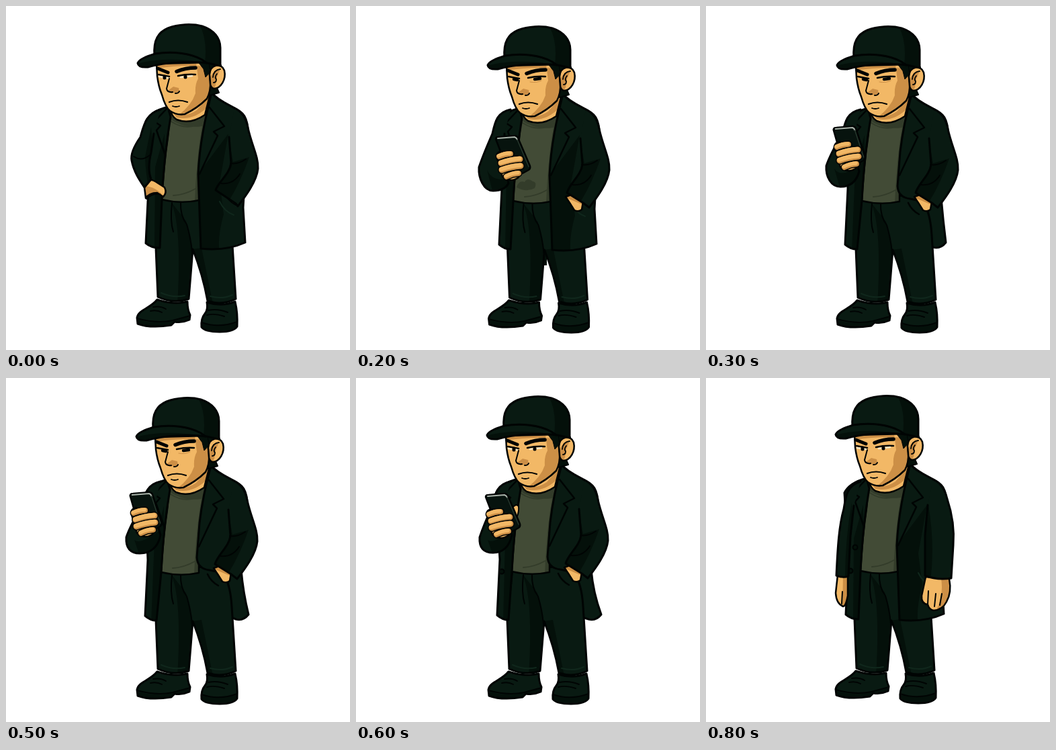
An HTML page with a canvas for the animation above (0.9 s loop, 512x512 px).

```html
<!DOCTYPE html>
<html lang="en">
<head>
<meta charset="utf-8">
<title>Man checking his phone</title>
<style>
  html, body { margin: 0; width: 100%; height: 100%; overflow: hidden; background: #fff; }
  canvas { display: block; width: 100vmin; height: 100vmin; }
</style>
</head>
<body>
<canvas id="stage" width="512" height="512"></canvas>
<script>
const ctx = document.getElementById('stage').getContext('2d');
const STEP = 100;
const INK = '#000403', COAT = '#091a12', DARK = '#04100a', LIGHT = '#10271c';
const SKIN = '#f2b866', TAN = '#cc8f46', SHIRT = '#424b36', MOSS = '#333c2a';

// head, body, legs: offsets; hem: left and right edge of the left coat panel
// elbow, under, cuff: corners of the raised sleeve; phone: its top left corner
const poses = [
  { head: [0, 0], body: [0, 0], legs: [0, 0], hem: [208, 229], left: 'thumb', right: 'deep' },
  { head: [0, 2], body: [1, 1], legs: [1, 0], hem: [209, 229], left: 'phone', right: 'pocket',
    phone: [145, 198], elbow: [166, 250], under: [192, 275], cuff: [220, 258], lean: -.15, down: true },
  { head: [0, 3], body: [2, 2], legs: [2.5, 1], hem: [211, 228], left: 'phone', right: 'pocket',
    phone: [208, 195], elbow: [183, 240], under: [204, 275], cuff: [227, 264], lean: 0, down: true, fold: true },
  { head: [-1, 3], body: [0, 2], legs: [0, 1], hem: [207, 225], left: 'phone', right: 'pocket', open: 357,
    phone: [190, 181], elbow: [179, 238], under: [200, 269], cuff: [228, 246], lean: -.1, down: true },
  { head: [-3, 3], body: [-2, 2], legs: [-3, .5], hem: [207, 224], left: 'phone', right: 'pocket', open: 356,
    phone: [178, 170], elbow: [175, 236], under: [195, 262], cuff: [227, 233], lean: -.17, down: true, button: true },
  { head: [-2, 2], body: [-1, 1], legs: [0, 0], hem: [208, 225], left: 'phone', right: 'pocket', open: 361,
    phone: [185, 172], elbow: [179, 237], under: [199, 261], cuff: [230, 234], lean: -.1, down: true },
  { head: [-1, 0], body: [0, 0], legs: [2, 0], hem: [210, 227], left: 'phone', right: 'pocket', open: 365,
    phone: [193, 174], elbow: [184, 237], under: [204, 260], cuff: [232, 234], lean: 0, button: true, thumb: true },
  { head: [-3, 2], body: [1, 1], legs: [-.5, 1], hem: [203, 228], left: 'pocket', right: 'pocket', down: true, buttons: true },
  { head: [-3, -1], body: [-2, -1], legs: [-2, -1], hem: [210, 229], left: 'hang', right: 'hang', buttons: true }
];

function fill(d, color) {
  ctx.fillStyle = color;
  ctx.fill(new Path2D(d));
}

function line(d, width = 2.5, color = INK) {
  ctx.lineWidth = width;
  ctx.strokeStyle = color;
  ctx.stroke(new Path2D(d));
}

function shape(d, color, width = 3) {
  fill(d, color);
  line(d, width);
}

function shaded(d, color, shadow, tone, width = 3) {
  fill(d, color);
  ctx.save();
  ctx.clip(new Path2D(d));
  fill(shadow, tone);
  ctx.restore();
  line(d, width);
}

function at([x, y], draw) {
  ctx.save();
  ctx.translate(x, y);
  draw();
  ctx.restore();
}

function drawLegs() {
  shaded('M231 284 L284 282 L306 279 L322 290 Q334 305 336 340 L342 436 Q322 446 300 439 Q293 400 278 362 L272 436 Q250 444 226 433 L223 360 Z',
    COAT, 'M246 292 Q262 330 255 445 L276 442 L278 364 L268 320 Z M277 362 L298 442 L308 443 L291 360 Z', DARK);
  line('M260 292 Q259 312 269 325 Q275 345 277 366 M247 293 Q244 320 249 336', 2);
  line('M231 427 Q249 435 266 431 M304 432 Q322 437 337 430', 2, LIGHT);
  shaded('M225 437 Q249 445 270 440 Q270 452 274 460 L273 467 Q262 472 251 470 L246 475 Q215 480 196 473 L195 464 C197 452 215 450 225 437 Z',
    COAT, 'M190 465 Q225 476 248 468 L276 460 V482 H190 Z', DARK);
  line('M195 465 Q224 473 248 468 L274 461 M219 448 Q230 446 238 451 M215 454 Q225 452 232 456', 2);
  shaded('M299 441 Q321 448 341 440 Q345 457 344 477 Q339 485 318 485 Q296 485 291 478 Q290 465 296 458 Q301 452 299 441 Z',
    COAT, 'M288 472 Q316 480 348 470 V490 H288 Z', DARK);
  line('M291 471 Q317 480 344 470 M301 453 Q315 450 330 456 M299 460 Q310 457 325 462', 2);
}

function drawShirt(p) {
  shaded('M244 160 L241 195 Q235 235 232 288 Q260 295 288 289 L288 230 L302 150 Z', SHIRT,
    'M244 160 Q270 181 304 158 L288 230 V292 H281 Q284 220 292 179 Q265 183 244 168 Z', MOSS, 2.5);
  line('M246 172 Q269 187 294 173', 2, MOSS);
  line('M249 282 Q266 281 282 272', 2, MOSS);
  if (p.fold) fill('M237 268 Q240 257 249 260 Q253 253 261 259 Q268 260 264 269 Q252 276 237 268 Z', MOSS);
}

function drawCoat(p) {
  const [l, r] = p.hem;
  shaded(`M241 150 L245 165 C241 192 236 215 232 288 L${r} 360 Q${l + 8} 360 ${l} 353 L${l + 4} 270 L208 172 Q215 157 241 150 Z`,
    COAT, `M236 190 L222 240 L${r - 8} 365 H${r + 4} L236 285 Z`, DARK);
  const shoulder = 'M306 129 C318 144 342 150 352 160 Q358 166 360 181';
  if (p.open) {
    shape(`${shoulder} L356 240 L338 292 L304 285 Q286 283 285 266 L289 215 C293 180 299 155 306 129 Z`, COAT);
    line('M301 291 Q306 302 317 308', 2.5);
  } else {
    shaded(`${shoulder} L353 300 L356 352 Q327 365 290 361 L286 250 C288 205 297 165 306 129 Z`,
      COAT, 'M286 250 L331 190 L318 262 L324 310 Q314 345 318 370 H286 Z', DARK);
    line('M318 291 Q325 306 339 311', 2, LIGHT);
  }
  line('M241 151 L221 172 L230 178 L224 185 L237 222', 2.5);
  line('M303 151 L325 179 L309 187 L315 193 L288 250', 2.5);
  if (p.button || p.buttons) dot(217, 288, 3.5);
  if (p.buttons) dot(224, 253, 3.5);
}

function dot(x, y, r) {
  ctx.beginPath();
  ctx.arc(x, y, r, 0, 7);
  ctx.fillStyle = DARK;
  ctx.fill();
  ctx.lineWidth = 2;
  ctx.strokeStyle = INK;
  ctx.stroke();
}

function drawRightArm(kind) {
  if (kind === 'hang') {
    shaded('M329 297 L364 300 Q368 320 360 334 Q354 346 341 347 Q334 346 332 338 Q322 337 323 325 Z', SKIN,
      'M352 300 Q356 325 344 348 H370 V298 Z', TAN, 2.5);
    line('M333 318 L332 338 M344 322 L342 341 M353 322 L350 339', 2);
    shaded('M340 152 Q356 159 361 181 C369 205 372 225 370 250 L367 299 Q345 302 328 295 L328 235 L332 190',
      COAT, 'M325 190 H333 Q343 250 336 303 H325 Z', DARK);
    return;
  }
  if (kind === 'deep') shape('M329 285 L346 290 L342 296 Q334 292 329 285 Z', SKIN, 2);
  else shaded('M310 282 L318 279 L336 289 L334 301 Q329 305 323 302 Q317 292 310 282 Z', SKIN,
    'M310 276 L338 289 L336 294 L312 284 Z', TAN, 2.5);
  const end = kind === 'deep' ? 'L342 294 L312 274' : 'L336 291 L312 276';
  shaded(`M340 152 Q356 159 360 181 C366 208 376 225 375 242 C373 262 355 285 345 298 ${end} C316 262 333 250 335 234 L332 195`,
    COAT, 'M330 190 L338 232 L362 225 Q350 260 333 288 L311 277 L334 238 Z', DARK);
  line('M334 234 Q345 236 357 228 M320 264 Q338 266 348 250', 2);
}

function drawFinger(x1, y1, x2, y2, w) {
  const d = `M${x1} ${y1} Q${(x1 + x2) / 2} ${(y1 + y2) / 2 - 2} ${x2} ${y2}`;
  line(d, w + 3);
  line(d, w, TAN);
  at([-.8, -1], () => line(d, w - 2.5, SKIN));
}

function drawPhone(p) {
  if (p.thumb) shape('M39 20 Q45 12 49 17 Q50 25 46 34 Z', SKIN, 2);
  ctx.save();
  ctx.transform(1, 0, p.lean, 1, 0, 0);
  shape('M0 3 Q0 0 4 0 L28 -2 Q31 -2 33 1 L51 43 Q52 47 49 49 L40 54 L20 55 Z', '#07130e', 2.5);
  line('M3 2 L28 0 Q31 1 32 4', 2, '#a9b2a9');
  line('M32 4 L49 44', 1.5, '#26362c');
  ctx.restore();
  shape('M2 32 Q-1 24 8 21 L24 25 L36 36 L34 60 Q22 69 10 59 Z', SKIN, 2.5);
  drawFinger(5, 29, 22, 25, 8);
  drawFinger(8, 39, 36, 33, 9);
  drawFinger(9, 49, 37, 43, 9);
  drawFinger(16, 59, 34, 54, 8);
}

function drawLeftArm(p) {
  if (p.left === 'thumb') {
    shaded('M205 262 Q214 256 222 261 L236 270 Q240 278 234 284 L225 278 Q213 278 208 286 Z', SKIN,
      'M205 268 Q222 268 236 284 L208 290 Z', TAN, 2.5);
    shaded('M230 154 C208 160 205 178 200 195 C191 208 185 220 187 230 C190 246 198 258 206 270 L216 258 C211 245 213 230 216 218 L220 190',
      COAT, 'M216 180 L207 225 Q208 250 212 268 L222 255 Z', DARK);
    line('M190 224 Q202 232 214 222 M209 287 Q218 278 229 280', 2);
  } else if (p.left === 'pocket') {
    shape('M200 268 L211 265 L208 276 Q202 281 198 287 Z', SKIN, 2);
    shaded('M230 154 C208 160 205 178 199 195 C189 212 181 225 182 240 C185 260 191 275 195 288 L199 272 L211 266 C208 252 212 236 215 220 L220 190',
      COAT, 'M216 180 L204 225 Q202 250 204 272 L218 260 Z', DARK);
    line('M186 234 Q200 242 212 231 M200 291 Q204 279 212 274', 2);
  } else if (p.left === 'hang') {
    shaded('M196 293 L211 294 L211 324 Q208 340 204 340 Q194 336 193 320 Z', SKIN, 'M204 294 L203 344 H214 V294 Z', TAN, 2.5);
    line('M203 318 L202 336', 2);
    shaded('M230 154 C210 160 208 175 205 195 C198 220 196 250 194 294 Q204 298 212 295 L215 235 L220 190',
      COAT, 'M217 185 Q207 240 207 300 H218 Z', DARK);
  } else {
    const [ex, ey] = p.elbow, [ux, uy] = p.under, [cx, cy] = p.cuff;
    shaded(`M230 154 C210 158 207 172 203 190 Q${ex + 6} ${ey - 18} ${ex} ${ey} C${ex - 1} ${ey + 16} ${ux - 14} ${uy} ${ux} ${uy} Q${cx - 6} ${uy} ${cx} ${cy} L${cx - 7} ${cy - 25} L221 190`,
      COAT, `M${ex + 12} ${ey + 4} Q${ux} ${uy - 12} ${cx} ${cy - 8} V${uy + 4} H${ux} Z`, DARK);
    at(p.phone, () => drawPhone(p));
  }
}

function drawNeck() {
  shaded('M245 154 Q246 164 254 169 Q274 177 296 162 L305 126 L268 145 Z', SKIN,
    'M244 152 Q262 170 284 155 L304 132 L300 150 Q280 171 254 166 Z', TAN, 2.5);
}

function drawHead(down) {
  shape('M297 82 L320 88 L314 122 L317 129 L303 133 L297 110 Z', DARK, 2);
  shaded('M224 86 L225 104 Q227 120 232 132 Q237 150 244 156 Q254 163 266 161 Q285 152 299 138 Q305 127 304 112 L301 84 Z', SKIN,
    'M283 84 L286 108 Q281 117 282 130 Q276 148 256 163 L300 146 L308 84 Z M222 84 L300 83 L299 90 Q262 87 224 93 Z', TAN, 2.5);
  shape('M286 83 L302 84 L304 98 L297 106 L294 94 Z', DARK, 1);
  shaded('M303 102 C304 86 321 84 325 96 C328 109 320 123 309 123 Q304 121 304 114 Z', SKIN,
    'M304 106 Q310 94 318 96 L312 111 Q314 120 307 124 Z', TAN, 2.5);
  line('M308 106 Q309 95 319 94 M314 101 Q310 106 313 109 Q313 114 309 114', 1.8);

  line('M226 93 L241 99', 5);
  line('M254 97.5 Q267 92 282 92', 5.5);
  line('M227 102 L243 105 M256 104 Q269 101 282 102', 2.5);
  if (down) {
    line('M235 106 L240 107 M266 106 L274 105', 4.5);
    line('M259 110 Q268 112 276 108', 1, TAN);
  } else {
    line('M228 105 L241 107 M260 106 L277 104', 2.5, '#f6e7c6');
    line('M236 105 V107 M267 105 V106', 5);
  }
  fill('M249 120 L257 122 L258 128 L246 130 L241 126 Z', TAN);
  line('M243 108 L239 123 Q240 129 248 128 M252 130 Q257 130 258 127', 2);
  line('M243 143 Q256 138 270 143', 2.2);
  line('M248 149 Q253 151 258 149', 1.8);

  shaded('M221 74 C219 50 227 39 241 33 C256 27 277 26 292 30 C310 36 319 48 319 62 L319 89 L296 84 L280 77 Z', COAT,
    'M288 28 Q300 50 296 84 L323 94 V40 Z', DARK);
  shaded('M196 85 C198 79 210 75 222 71 C247 67 275 70 292 80 L299 85 Q282 82 255 84 Q232 85 211 91 Q197 92 196 85 Z', COAT,
    'M195 86 Q240 74 299 85 V94 H195 Z', DARK);
  line('M222 71 Q262 65 292 80', 2);
}

function drawPose(p) {
  ctx.fillStyle = '#fff';
  ctx.fillRect(0, 0, 512, 512);
  ctx.lineJoin = ctx.lineCap = 'round';
  if (p.open) {
    shape(`M330 280 L350 285 Q353 320 ${p.open} 352 Q${p.open - 8} 362 ${p.open - 19} 359 L330 354 Z`, COAT);
  }
  if (p.fold) fill('M275 362 H284 V386 H278 Z', DARK);
  at(p.legs, drawLegs);
  at(p.body, () => {
    drawShirt(p);
    drawNeck();
    drawCoat(p);
    drawRightArm(p.right);
  });
  drawLeftArm(p);
  at(p.head, () => drawHead(p.down));
}

function tick() {
  drawPose(poses[Math.floor(performance.now() / STEP) % poses.length]);
  requestAnimationFrame(tick);
}
tick();
</script>
</body>
</html>
```
